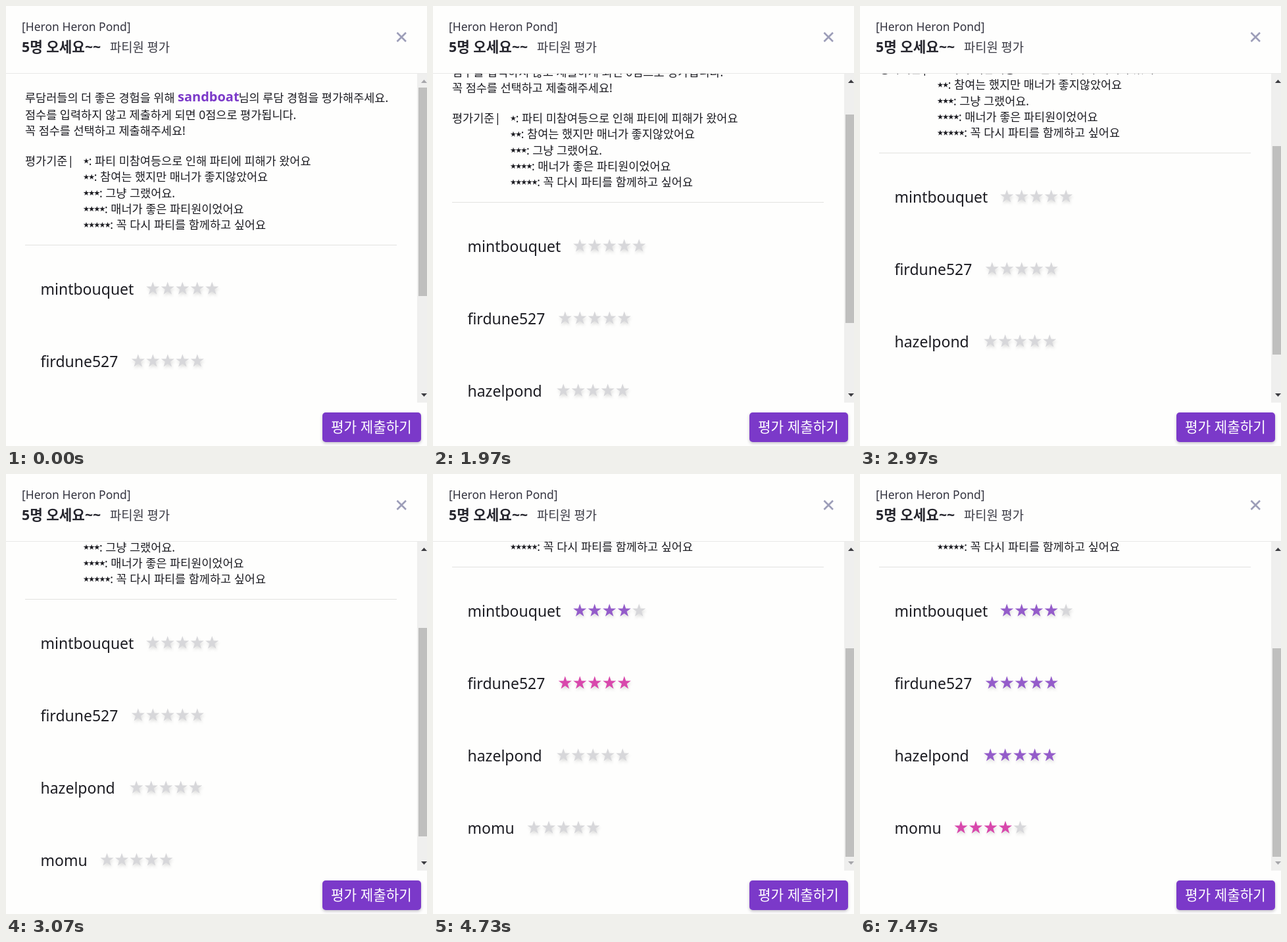
An HTML page that plays this animation: 640 px wide and 669 px high, repeating every 8 s.

```html
<!DOCTYPE html>
<html lang="ko">
<head>
<meta charset="utf-8">
<title>파티원 평가</title>
<style>
  html, body { margin: 0; width: 100%; height: 100%; overflow: hidden; background: #fefefd; }
  body { position: relative; font-family: "Noto Sans", "Noto Sans CJK KR", "Noto Sans CJK", sans-serif; }
  span { position: absolute; height: 40px; line-height: 40px; white-space: pre; }
  svg { position: absolute; left: 0; top: 0; overflow: visible; }
  #view { position: absolute; left: 0; top: 103px; width: 625px; height: 500px; overflow: hidden; }
  #page { position: absolute; left: 0; top: -103px; width: 625px; height: 830px; }
  #head { position: absolute; left: 0; top: 102px; width: 640px; height: 1px; background: #e9e9e8; }
  #rule { position: absolute; left: 29px; top: 363px; width: 565px; height: 1px; background: #e2e2e0; }
  #bar { position: absolute; left: 625px; top: 103px; width: 15px; height: 500px; background: #efefee; }
  #thumb { position: absolute; left: 2px; top: 21px; width: 13px; height: 317px; background: #bfbfbe; }
  #send { position: absolute; left: 481px; top: 618px; width: 150px; height: 45px; border-radius: 5px;
          background: #7b39c9; box-shadow: 0 2px 4px rgba(60, 50, 80, .3); }
  .rate { filter: drop-shadow(1px 3px 2px rgba(0, 0, 0, .12)); }
</style>
</head>
<body>
<div id="head"></div>
<div id="view"><div id="page"><div id="rule"></div></div></div>
<div id="bar"><div id="thumb"></div></div>
<div id="send"></div>
<script>
(() => {
const LOOP = 8000, FRAME = 1000 / 30;
const IDLE = '#d7d7da', HOVER = '#d848ac', SET = '#945cca';
const INK = '#1c1c22';
const $ = id => document.getElementById(id);
const page = $('page'), thumb = $('thumb'), body = document.body;

// y is the vertical centre of the line
function text(parent, x, y, size, str, color = INK, weight = 400) {
  const el = document.createElement('span');
  el.textContent = str;
  el.style.cssText = `left:${x}px;top:${y - 20}px;font-size:${size}px;color:${color};font-weight:${weight}`;
  parent.append(el);
}

function svg(parent, width, height) {
  const el = document.createElementNS('http://www.w3.org/2000/svg', 'svg');
  el.setAttribute('width', width);
  el.setAttribute('height', height);
  parent.append(el);
  return el;
}

function path(parent, d, fill) {
  const el = document.createElementNS('http://www.w3.org/2000/svg', 'path');
  el.setAttribute('d', d);
  el.setAttribute('fill', fill);
  parent.append(el);
  return el;
}

function star(cx, cy, r) {
  let d = '';
  for (let i = 0; i < 10; i++) {
    const a = i * Math.PI / 5, k = i % 2 ? r * 0.385 : r;
    d += (i ? 'L' : 'M') + (cx + k * Math.sin(a)).toFixed(2) + ' ' + (cy - k * Math.cos(a)).toFixed(2);
  }
  return d + 'Z';
}

// Header and button
text(body, 24, 31, 17.5, '[Heron Heron Pond]', '#33333f', 500);
text(body, 24, 62, 21.25, '5명 오세요~~', '#26262e', 700);
text(body, 158, 62.5, 18.75, '파티원 평가', '#3a3a44');
text(body, 494, 640, 21.25, '평가 제출하기', '#fff', 500);
const icons = svg(body, 640, 669);
const cross = path(icons, 'M594.5 40.5L608 54M608 40.5L594.5 54', 'none');
cross.setAttribute('stroke', '#9c9db8');
cross.setAttribute('stroke-width', 2.6);
const up = path(icons, 'M631 117L635.5 112L640 117Z', INK);
const down = path(icons, 'M631 589L635.5 594L640 589Z', INK);

// Scrolling text
text(page, 29, 139, 17.5, '루담러들의 더 좋은 경험을 위해');
text(page, 261, 138, 20, 'sandboat', '#7b39c9', 700);
text(page, 353.5, 139, 17.5, '님의 루담 경험을 평가해주세요.');
text(page, 29, 165, 17.5, '점수를 입력하지 않고 제출하게 되면 0점으로 평가됩니다.');
text(page, 29, 189, 17.5, '꼭 점수를 선택하고 제출해주세요!');
text(page, 29, 235, 17.5, '평가기준|');

const small = svg(page, 625, 830);
['파티 미참여등으로 인해 파티에 피해가 왔어요',
 '참여는 했지만 매너가 좋지않았어요',
 '그냥 그랬어요.',
 '매너가 좋은 파티원이었어요',
 '꼭 다시 파티를 함께하고 싶어요'].forEach((str, i) => {
  const y = 235 + i * 24.3;
  for (let k = 0; k <= i; k++) path(small, star(122 + k * 8.15, y + 0.8, 4.5), INK);
  text(page, 117.5 + (i + 1) * 8.15, y, 17.5, ': ' + str);
});

// Rating rows
const rows = [['mintbouquet', 223.2], ['firdune527', 200.8], ['hazelpond', 198.2], ['momu', 153.5]]
  .map(([name, x], i) => {
    const y = 430 + i * 110;
    text(page, 52.5, y, 23, name);
    const g = svg(page, 625, 830);
    g.setAttribute('class', 'rate');
    return Array.from({ length: 5 }, (_, k) => path(g, star(x + k * 22.5, y - 0.2, 10.6), IDLE));
  });

// time, row, stars lit, colour
const ratings = [
  [3600, 0, 3, HOVER], [4030, 0, 4, HOVER], [4730, 0, 4, SET], [4730, 1, 5, HOVER],
  [5730, 1, 5, SET], [6000, 2, 5, HOVER], [6970, 2, 5, SET], [6970, 3, 5, HOVER], [7330, 3, 4, HOVER]
];

function ease(t, start, span) {
  const p = Math.min(1, Math.max(0, (t - start) / span));
  return p * p * (3 - 2 * p);
}

function scrollAt(t) {
  if (t < 1866) return 0;
  return Math.round(125 * ease(t, 1792, 341) + 97 * ease(t, 2867, 400));
}

function draw(now) {
  const t = Math.floor((now % LOOP + 3.4) / FRAME) * FRAME;
  const s = scrollAt(t);
  page.style.transform = `translateY(${-s}px)`;
  thumb.style.top = 21 + Math.round(s * 0.634) + 'px';
  up.setAttribute('fill', s > 0 ? '#3c3c40' : '#a6a6aa');
  down.setAttribute('fill', s < 222 ? '#3c3c40' : '#a6a6aa');

  const lit = rows.map(() => [0, IDLE]);
  for (const [at, row, n, color] of ratings) if (t + 4 >= at) lit[row] = [n, color];
  rows.forEach((stars, i) => stars.forEach((el, k) =>
    el.setAttribute('fill', k < lit[i][0] ? lit[i][1] : IDLE)));
}

const begin = performance.now();
function tick() {
  draw(performance.now() - begin);
  requestAnimationFrame(tick);
}
tick();
})();
</script>
</body>
</html>
```
